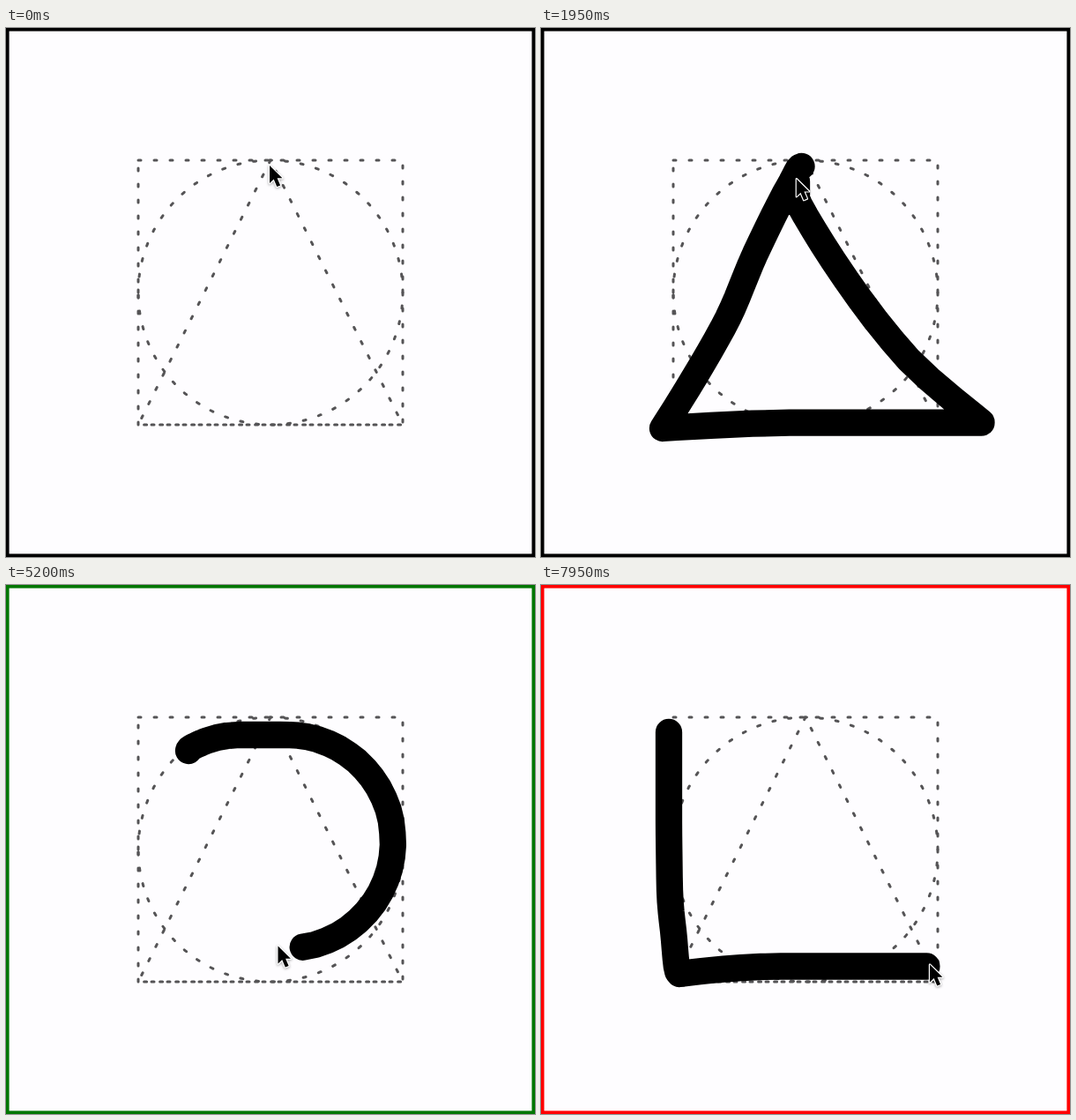
Recreate the animation shown at these times as an HTML page. Size 600 px wide and 600 px high, loop 8 s.

```html
<!DOCTYPE html>
<html lang="en">
<head>
<meta charset="utf-8">
<title>Shape tracing</title>
<style>
  html, body { margin: 0; width: 100%; height: 100%; overflow: hidden; background: #fefdff; }
  svg { display: block; width: 100%; height: 100%; }
  #guide { fill: none; stroke: #555456; stroke-width: 3; stroke-linecap: round; stroke-dasharray: 3 15; }
  #ink { fill: none; stroke: #000; stroke-width: 30.3; stroke-linecap: round; stroke-linejoin: round; }
  #cursor { filter: drop-shadow(0 1.5px 1.5px rgba(0, 0, 0, .35)); }
</style>
</head>
<body>
<svg viewBox="0 0 600 600">
  <rect width="600" height="600" fill="#fefdff"/>
  <g id="guide">
    <path d="M150 150H450V450H150Z"/>
    <path d="M150 300A150 150 0 0 1 450 300A150 150 0 0 1 150 300"/>
    <path d="M300 150L150 450H450Z"/>
  </g>
  <path id="ink"/>
  <rect id="frame" x="1.8" y="1.8" width="596.4" height="596.4" fill="none" stroke-width="3.6"/>
  <g id="cursor">
    <path d="M0 0V20L4.7 15.6L8.3 24L12.1 22.4L8.6 14.2H14.4Z"
      fill="#000" stroke="#fff" stroke-width="2.4" stroke-linejoin="round" paint-order="stroke"/>
  </g>
</svg>
<script>
const LOOP = 8000, STEP = 50, LAG = 50;

// Start, border colour, and when the pen goes down and up
const scenes = [
  { start: 0, color: '#000', down: 50, up: 1900 },
  { start: 3550, color: '#007600', down: 4100, up: 5700 },
  { start: 6000, color: '#f00', down: 6900, up: 7950 }
];

// Key points of the pointer: [ms, x, y]
const triangle = [
  [0, 299, 158], [50, 295.5, 157], [200, 281, 180], [350, 243, 256], [500, 212, 329],
  [800, 138, 454], [900, 138, 454], [1000, 282, 447.7], [1150, 490, 447.7], [1200, 499.5, 447.7],
  [1300, 499.5, 447], [1400, 417, 376], [1550, 320, 246], [1650, 290, 193], [1900, 290, 174]
];
const toCircle = [
  [2200, 287, 171], [2750, 391, 235], [3250, 391, 235], [3300, 354, 217],
  [4100, 207, 188], [4300, 224, 178], [4400, 264, 170], [4450, 311, 170]
];
const square = [
  [5700, 241, 188], [6450, 241, 188], [6900, 145, 167], [7100, 145, 255], [7250, 146, 346],
  [7350, 150, 392], [7500, 157, 441], [7600, 192, 437], [7700, 272, 432.5],
  [7850, 428, 432.5], [7950, 441, 432.5]
];

// Clockwise sweep around a slightly small circle
const arc = Array.from({ length: 24 }, (_, k) => {
  const a = (-84 + 317 * (k / 24) ** 1.06) * Math.PI / 180;
  return [4500 + k * STEP, 319 + 120 * Math.cos(a), 291 + 121 * Math.sin(a)];
});

const track = [...triangle, ...toCircle, ...arc, ...square];

const byId = id => document.getElementById(id);
const ink = byId('ink'), frame = byId('frame'), cursor = byId('cursor');

// Speed at key i: harmonic mean of both sides, zero where the direction turns
function slope(i, axis) {
  if (i === 0 || i === track.length - 1) return 0;
  const rate = j => (track[j + 1][axis] - track[j][axis]) / (track[j + 1][0] - track[j][0]);
  const a = rate(i - 1), b = rate(i);
  return a * b > 0 ? 2 * a * b / (a + b) : 0;
}

// Smooth position without overshoot
function at(t) {
  const next = track.findIndex(k => k[0] > t);
  if (next < 0) return track[track.length - 1].slice(1);
  const i = next - 1, span = track[next][0] - track[i][0], u = (t - track[i][0]) / span;
  return [1, 2].map(axis => {
    const p = track[i][axis], q = track[next][axis];
    return p + (q - p) * u * u * (3 - 2 * u)
      + span * u * (1 - u) * (slope(i, axis) * (1 - u) - slope(next, axis) * u);
  });
}

function strokePath({ down, up }, t) {
  const pts = [];
  for (let s = down; s <= Math.min(t, up); s += STEP / 2) {
    pts.push(at(s).map(v => v.toFixed(1)).join(' '));
  }
  return pts.length ? 'M' + pts[0] + 'L' + pts.join('L') : '';
}

function draw(t) {
  const scene = scenes.filter(s => s.start <= t).pop();
  const [x, y] = at(t);
  frame.setAttribute('stroke', scene.color);
  ink.setAttribute('d', strokePath(scene, t - LAG));
  cursor.setAttribute('transform', `translate(${x.toFixed(1)} ${(y - 2).toFixed(1)})`);
}

const start = performance.now();
function tick() {
  const t = (performance.now() - start) % LOOP;
  draw(Math.floor(t / STEP) * STEP);
  requestAnimationFrame(tick);
}
draw(0);
requestAnimationFrame(tick);
</script>
</body>
</html>
```
